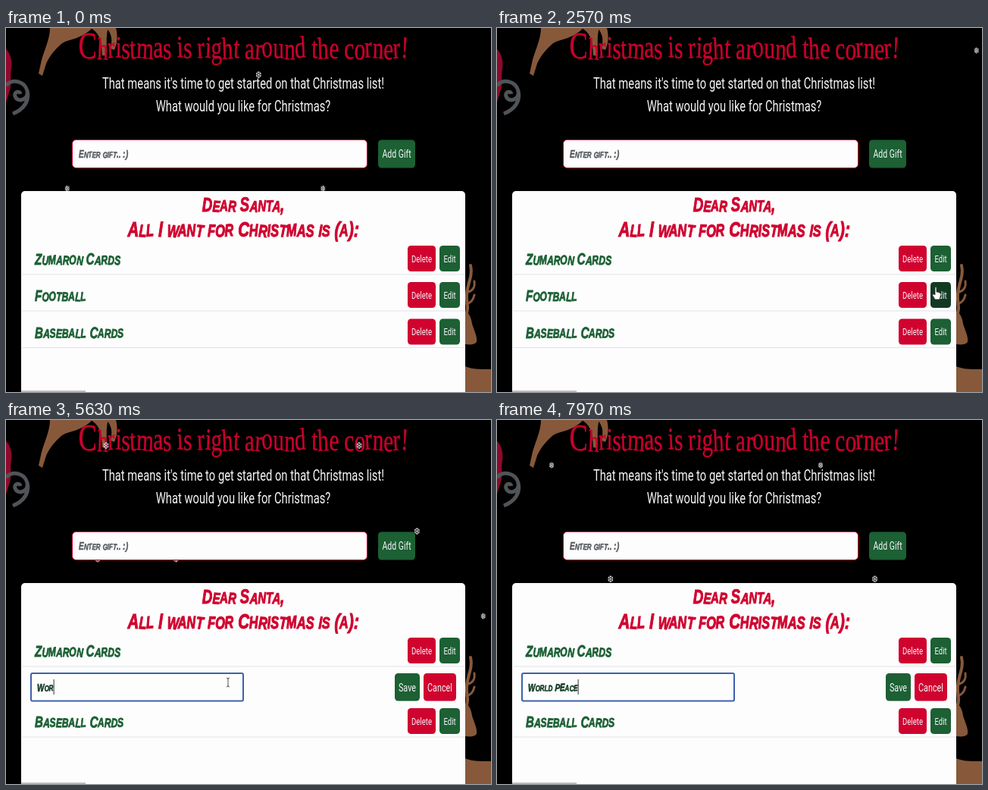
Write an HTML page that moves like this. It is 640 px wide and 480 px high and loops after 8 s.

```html
<!DOCTYPE html>
<html lang="en">
<head>
<meta charset="utf-8">
<title>Christmas list</title>
<style>
  html, body { margin: 0; width: 100%; height: 100%; overflow: hidden; background: #000; }
  svg { display: block; width: 100%; height: 100%; }
  text { white-space: pre; }
  .plain { font-family: Roboto, "Open Sans", sans-serif; stroke: none; }
  .title { font-family: "Liberation Serif", serif; stroke-width: .5px; }
  .marker { font: italic bold 20px "Liberation Sans", Arial, sans-serif; stroke-width: .04em; }
  .flake { font-family: "DejaVu Sans", sans-serif; fill: #dcdce0; text-anchor: middle; }
</style>
</head>
<body>
<svg id="stage" viewBox="0 0 640 480" preserveAspectRatio="none"></svg>
<script>
const LOOP = 8000;
const SQUEEZE = 0.72; // the page is shown narrower than it was laid out
const RED = '#d0032f', GREEN = '#1c6034', DARK_GREEN = '#123a22';
const WHITE = '#f6f6f9', PAPER = '#fdfdfe', HINT = '#585c60', BROWN = '#87593a';
const stage = document.getElementById('stage');

const label = (cls, x, y, size, fill, content, extra = '') =>
  `<text class="${cls}" transform="translate(${x} ${y}) scale(${SQUEEZE} 1)" style="font-size:${size}px" fill="${fill}" stroke="${fill}" ${extra}>${content}</text>`;
const centered = 'text-anchor="middle"';

// Uneven lettering: every glyph leans and sits a little differently.
const glyphs = [...Array(40).keys()];
const tilt = `rotate="${glyphs.map(i => Math.round(4 * Math.sin(i * 2.3))).join(' ')}"`;
const lift = i => 1.2 * Math.sin(i * 1.7);
const bounce = `dy="${glyphs.map(i => (lift(i) - lift(i - 1)).toFixed(1)).join(' ')}"`;

// Marker lettering: capitals throughout, with lower case set smaller.
const smallCaps = text => text.replace(/[a-z]+/g, run =>
  `<tspan style="font-size:.8em">${run.toUpperCase()}</tspan>`);
const marker = (x, y, size, fill, text, extra = '') =>
  label('marker', x, y, size, fill, smallCaps(text), `${tilt} ${extra}`);

const box = (x, y, w, h, r, fill, extra = '') =>
  `<rect x="${x}" y="${y}" width="${w}" height="${h}" rx="${r}" fill="${fill}" ${extra}/>`;
const button = (x, y, w, h, fill, text, size, id = '') =>
  box(x, y, w, h, 4.5, fill, id && `id="${id}"`) +
  label('plain', x + w / 2, y + h / 2 + size * 0.36, size, WHITE, text, centered);
const rule = y => `<path d="M21 ${y}H605" stroke="#dfe3e6"/>`;

const row = (id, y, text) => `<g id="${id}">
  ${marker(38, y + 25, 21, GREEN, text)}
  ${button(530, y, 37, 34, RED, 'Delete', 13.3)}
  ${button(572, y, 27, 34, GREEN, 'Edit', 13.3, id + 'Edit')}
  ${rule(y + 38)}</g>`;

const titleText = '<tspan style="font-size:1.25em">C</tspan>hristmas is right around the corner!';

const scenery = `
  <g fill="${BROWN}">
    <path d="M58 0C58 14 51 28 47 42L43 60L48 63L53 47C58 36 65 28 73 21C82 14 98 16 114 0Z"/>
    <path d="M112 0C124 8 126 16 127 36L132 37C134 22 131 12 135 0Z"/>
    <path d="M133 0C139 8 141 14 138 27L143 29C148 17 147 8 145 0Z"/>
  </g>
  <path d="M0 28C5 32 9 43 7 54C5 64 8 72 5 82L0 98Z" fill="#8e0a2c"/>
  <path d="M0 76C8 66 25 70 28 83C30 95 15 99 12 90C10 84 18 82 19 87M28 83C31 96 24 107 9 113" fill="none" stroke="#505458" stroke-width="5"/>
  <g fill="none" stroke="${BROWN}" stroke-width="4" stroke-linecap="round">
    <path d="M613 313C617 329 606 341 608 358C609 367 610 372 607 378"/>
    <path d="M610 348C617 346 619 340 618 334M608 364C614 362 617 357 618 352" stroke-width="3"/>
  </g>
  <g fill="${BROWN}">
    <path d="M600 374C608 370 614 380 615 390C618 400 622 406 621 414C616 420 606 417 600 415Z"/>
    <path d="M600 443C612 451 627 450 640 450V480H600Z"/>
  </g>`;

const flakes = [ // left edge in percent, fall delay and sway delay in seconds
  [20, 6, .5, '❅'], [30, 4, 2, '❆'], [40, 2, 2, '❅'], [50, 8, 3, '❆'], [60, 6, 2, '❅'],
  [70, 2.5, 1, '❆'], [80, 1, 0, '❅'], [25, 2, 0, '❅'], [65, 4, 2.5, '❆']
].map(([left, fall, sway, glyph]) => ({ left, fall, sway, glyph }));

stage.innerHTML = `
  ${box(0, 0, 640, 480, 0, '#000')}
  ${scenery}
  ${label('title', 313, 38.5, 40.5, '#c9022c', titleText, `${centered} ${tilt} ${bounce}`)}
  ${label('plain', 313, 80, 20.5, WHITE, "That means it's time to get started on that Christmas list!", centered)}
  ${label('plain', 313, 110, 20.5, WHITE, 'What would you like for Christmas?', centered)}
  ${flakes.map(f => `<g class="snow"><text class="flake" transform="scale(.8 1)" y="4.5" font-size="12">${f.glyph}</text></g>`).join('')}
  ${box(87.5, 147.5, 389, 37, 5, PAPER, `stroke="${RED}"`)}
  ${marker(96, 171, 14, HINT, 'Enter gift.. :)')}
  ${button(491, 147.5, 49, 37, GREEN, 'Add Gift', 14.6)}
  ${box(20, 215, 586, 280, 5, PAPER)}
  ${marker(313, 242, 26, RED, 'Dear Santa,', centered)}
  ${marker(313, 275, 28.4, RED, 'All I want for Christmas is (a):', centered)}
  ${row('first', 287, 'Zumaron Cards')}
  ${row('second', 335, 'Football')}
  ${row('third', 383.5, 'Baseball Cards')}
  <g id="editor">
    ${box(33, 334, 280, 36.5, 2, PAPER, 'id="field"')}
    ${marker(41, 357.5, 14, HINT, 'Edit gift', 'id="hint"')}
    ${marker(41, 357.5, 14, DARK_GREEN, '', 'id="typed"')}
    <path id="caret" d="M.5 342V362" stroke="#333"/>
    ${button(513, 334, 33, 36.5, GREEN, 'Save', 15)}
    ${button(551, 334, 43, 36.5, RED, 'Cancel', 15)}
  </g>
  ${box(20, 478, 85, 2, 0, '#bfbdbb')}
  <g id="pointer">
    <path id="arrow" d="M0 0V11L2.4 8.8L4 12.6L5.6 12L4.1 8.2H7Z" fill="#111" stroke="#fff" stroke-width=".6"/>
    <path id="hand" d="M-1 1C-1 -1 1 -1 1 1V6L5 7C7 8 7 10 6 12L5 16H-1L-4 11C-5 9 -3 8 -1 10Z" fill="#fff" stroke="#222" stroke-width=".7"/>
    <path id="beam" d="M-2 -6Q0 -6 0 -4Q0 -6 2 -6M0 -4V4M-2 6Q0 6 0 4Q0 6 2 6" fill="none" stroke="#555"/>
  </g>`;

const part = Object.fromEntries([...stage.querySelectorAll('[id]')].map(el => [el.id, el]));
const snow = [...stage.querySelectorAll('.snow')];
const show = (el, on) => el.setAttribute('visibility', on ? 'inherit' : 'hidden');
const mod = (a, n) => ((a % n) + n) % n;

const EDIT_AT = 2800, FOCUS_AT = 4200, HIDE_POINTER = 6750;
const path = [ // time, x, y
  [850, 616, 262], [1530, 580, 317], [2050, 579, 342], [2850, 579, 342],
  [3650, 315, 331], [3850, 315, 331], [4150, 293, 346], [LOOP, 293, 346]
];
const keys = [
  [5080, 'W'], [5280, 'Wo'], [5450, 'Wor'], [5650, 'Worl'], [5850, 'World'], [6050, 'World '],
  [6400, 'World a'], [6720, 'World '], [6950, 'World P'], [7150, 'World PE'],
  [7350, 'World PEa'], [7550, 'World PEac'], [7750, 'World PEace']
];

function pointerAt(t) {
  const i = path.findIndex(p => p[0] > t);
  const [t0, x0, y0] = path[i - 1], [t1, x1, y1] = path[i];
  const p = (t - t0) / (t1 - t0), k = p * p * (3 - 2 * p);
  return [x0 + (x1 - x0) * k, y0 + (y1 - y0) * k];
}

function drawSnow(t) {
  const s = t / 1000;
  flakes.forEach((f, i) => {
    const y = -69 + 75 * mod(s - 0.26 - f.fall, 10);
    const sway = (1 - Math.cos((s - 0.58 - f.sway) * Math.PI * 2 / 3)) / 2;
    snow[i].setAttribute('transform', `translate(${-146 + 9.25 * f.left + 51 * sway} ${y})`);
  });
}

function drawPointer(t) {
  const visible = t >= path[0][0] && t < HIDE_POINTER;
  show(part.pointer, visible);
  if (!visible) return;
  part.pointer.setAttribute('transform', `translate(${pointerAt(t)})`);
  const kind = t < 1900 ? 'arrow' : t < 3000 ? 'hand' : t < 3950 ? 'arrow' : 'beam';
  for (const k of ['arrow', 'hand', 'beam']) show(part[k], k === kind);
}

let shownText = '';
function drawEditor(t) {
  const editing = t >= EDIT_AT, focused = t >= FOCUS_AT;
  show(part.second, !editing);
  show(part.editor, editing);
  part.third.setAttribute('transform', `translate(0 ${editing ? -3.5 : 0})`);
  part.secondEdit.setAttribute('fill', t >= 1900 && !editing ? DARK_GREEN : GREEN);
  part.field.setAttribute('stroke', focused ? '#3d62ad' : '#76767a');
  part.field.setAttribute('stroke-width', focused ? 2 : 1);

  const key = keys.filter(k => k[0] <= t).pop();
  const text = key ? key[1] : '';
  if (text !== shownText) {
    part.typed.innerHTML = smallCaps(text);
    shownText = text;
  }
  show(part.hint, editing && !text);
  const since = t - (key ? key[0] : FOCUS_AT);
  show(part.caret, focused && since % 1000 < 500);
  const width = text ? part.typed.getComputedTextLength() * SQUEEZE : 0;
  part.caret.setAttribute('transform', `translate(${41 + width} 0)`);
}

function frame(now) {
  const t = now % LOOP;
  drawSnow(t);
  drawPointer(t);
  drawEditor(t);
  requestAnimationFrame(frame);
}
frame(0);
</script>
</body>
</html>
```
